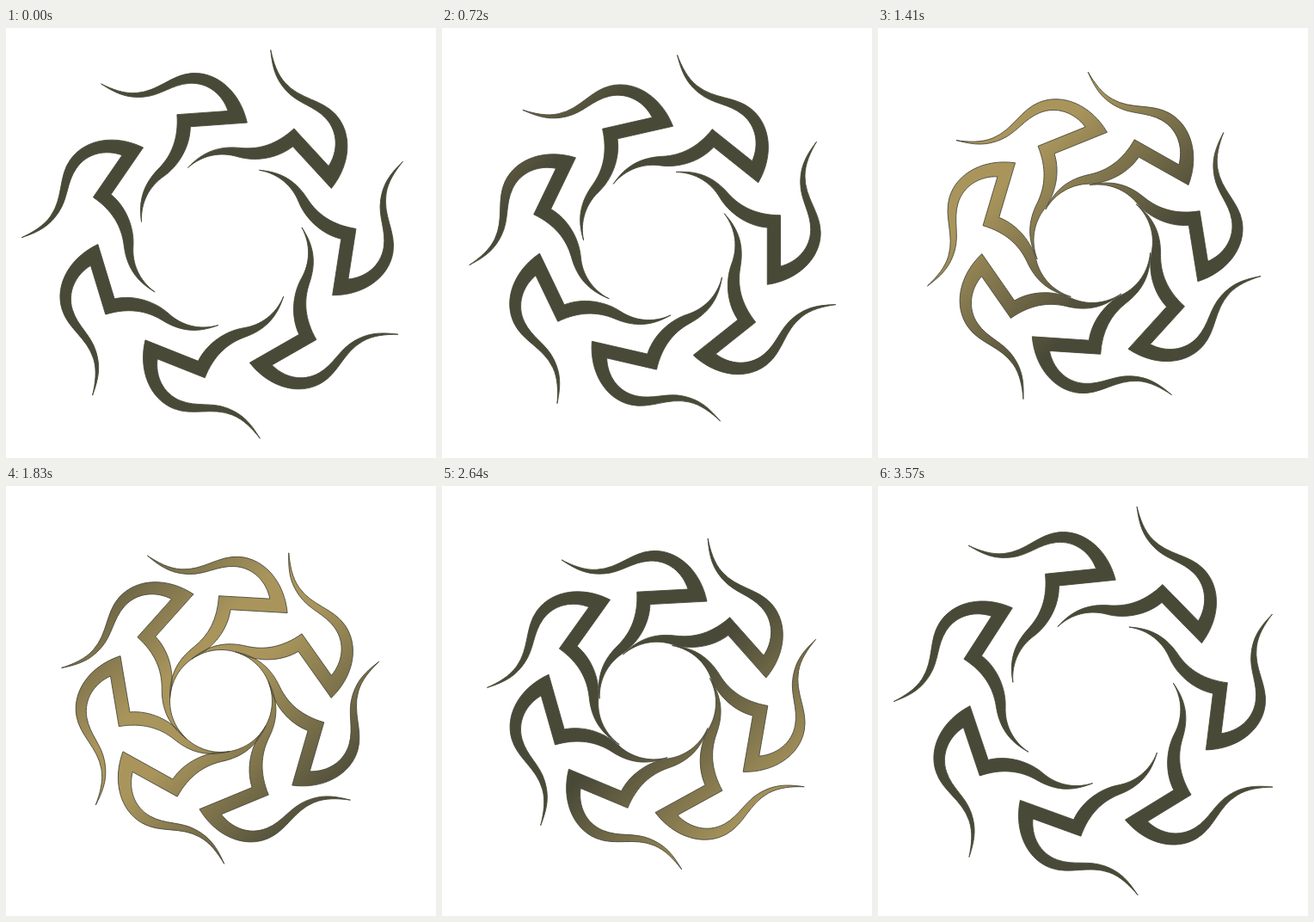
Write an HTML page with a canvas that moves like this. It is 500 px wide and 500 px high and loops after 3600 ms.

```html
<!DOCTYPE html>
<html lang="en">
<head>
<meta charset="utf-8">
<title>Seven-armed swirl</title>
<style>
  html, body { margin: 0; width: 100%; height: 100%; overflow: hidden; background: #fff; }
  canvas { display: block; width: 500px; height: 500px; }
</style>
</head>
<body>
<canvas id="stage" width="500" height="500"></canvas>
<script>
const LOOP = 3600, ARMS = 7, STEP = 360 / ARMS;
const DARK = '#494938', GOLD = '#a9955c';
const ctx = document.getElementById('stage').getContext('2d');

const arm = new Path2D(`M137.4,40.2 C173,35 199.3,10 199.3,-20 C199.3,-44 181,-60 181,-86
  C181,-100 187,-113 194.5,-126 C180,-107 175.8,-95 175.8,-78 C175.8,-58 187.8,-44 187.8,-24
  C187.8,-2 172,14 152.6,19 L152.6,-40.4 C125,-40.4 106,-50 92,-65.5 C75.5,-84.5 57,-92.5 31,-90.5
  C54,-90 72,-78 82,-61 C92,-44 113,-28 137.4,-26 Z`);

const smooth = x => x * x * (3 - 2 * x);

// 0 = arms spread, 1 = arms closed around the ring
function closing(t) {
  const peak = 0.6 * LOOP;
  return smooth(t < peak ? t / peak : (LOOP - t) / (LOOP - peak));
}

// A gold band that crosses the stage along its diagonal
function sheen(t) {
  const middle = 140 + 0.21 * (t - 1410), half = 148;
  const g = ctx.createLinearGradient(middle - half, middle - half, middle + half, middle + half);
  g.addColorStop(0, DARK);
  g.addColorStop(0.42, GOLD);
  g.addColorStop(0.58, GOLD);
  g.addColorStop(1, DARK);
  return g;
}

function draw(t) {
  const s = closing(t), spin = 4 * STEP * t / LOOP - 41.14;
  const shape = new Path2D();
  for (let i = 0; i < ARMS; i++) {
    shape.addPath(arm, new DOMMatrix()
      .translate(250, 250)
      .rotate(spin + i * STEP)
      .translate(-35 * s, 30.6 * s)
      .rotate(6 * s - 1.55));
  }
  ctx.fillStyle = '#fff';
  ctx.fillRect(0, 0, 500, 500);
  ctx.fillStyle = sheen(t);
  ctx.fill(shape);
  ctx.strokeStyle = DARK;
  ctx.lineWidth = 0.9;
  ctx.lineJoin = 'round';
  ctx.stroke(shape);
}

const start = performance.now();
function tick() {
  draw((performance.now() - start) % LOOP);
  requestAnimationFrame(tick);
}
tick();
</script>
</body>
</html>
```
